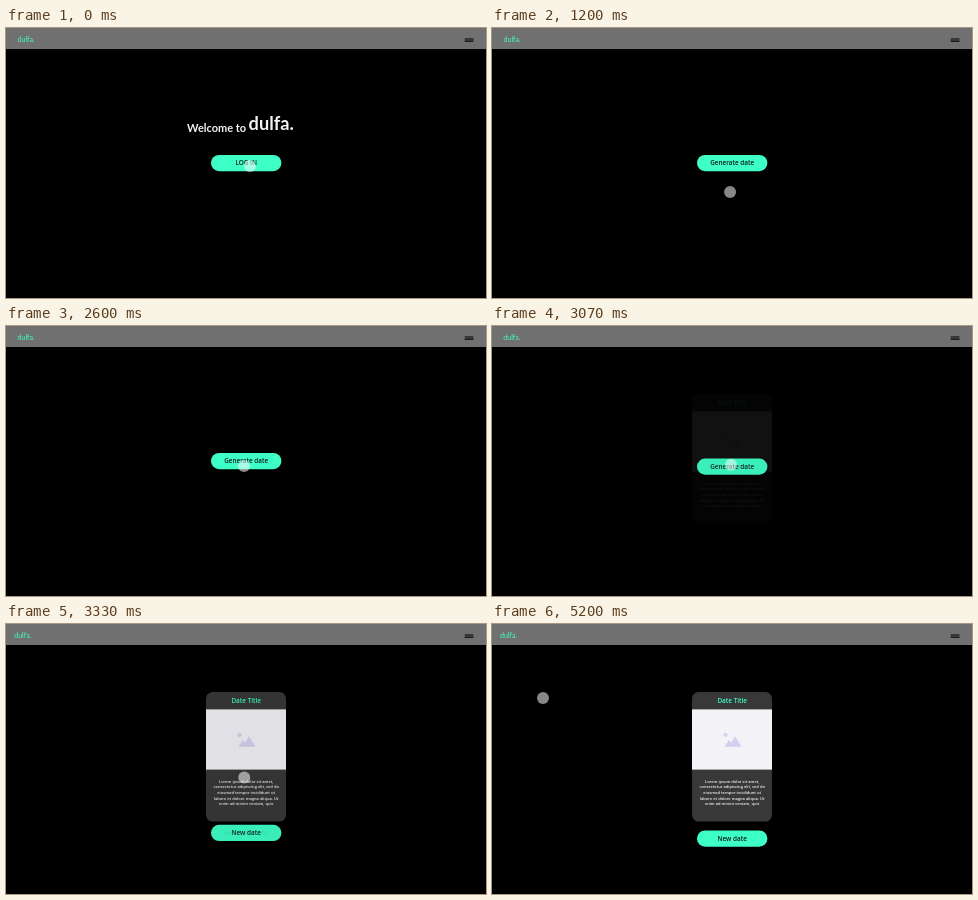
An HTML page that plays this animation: 480 px wide and 270 px high, repeating every 5.27 s.

```html
<!DOCTYPE html>
<html lang="en">
<head>
<meta charset="utf-8">
<title>Date generator prototype</title>
<style>
  html, body { margin: 0; width: 100%; height: 100%; overflow: hidden; background: #000; }
  svg { display: block; width: 100%; height: 100%; }
  text { font-family: "Open Sans", "Noto Sans", sans-serif; font-weight: 600; font-size: 6.4px; }
  .brand { font-family: Lato, sans-serif; }
  .mid { text-anchor: middle; }
  .body { font-size: 4px; fill: #f2f2f2; }
</style>
</head>
<body>
<svg viewBox="0 0 480 270">
  <rect width="480" height="270"/>
  <rect width="480" height="21" fill="#707070"/>
  <text id="logo" class="brand" y="13.6" fill="#3effc6" style="font-size:7px;font-weight:400">dulfa.</text>
  <path d="M458.7 11h8.8M458.7 13.2h8.8" stroke="#000" stroke-width="1.2"/>

  <g id="welcome" fill="#f4f4f4">
    <text class="brand" x="181" y="104" style="font-size:11px;font-weight:700">Welcome to</text>
    <text class="brand" x="242.6" y="102.4" style="font-size:18.2px;font-weight:700">dulfa.</text>
  </g>

  <g id="card">
    <rect x="200" y="68" width="80" height="129.6" rx="6.5" fill="#383838"/>
    <text class="mid" x="240.2" y="79.4" fill="#3effc6">Date Title</text>
    <rect x="200" y="85.4" width="80" height="60.2" fill="#f2f2f7"/>
    <g fill="#d3d1ef">
      <circle cx="233.6" cy="110.8" r="2.1"/>
      <path d="M232.4 122.8l4.6-6.8 2.2 3.1 3.8-6.9 6.6 10.6z"/>
    </g>
    <g id="copy"></g>
  </g>

  <g id="button">
    <rect id="pill" x="205" y="127" width="70.4" height="16.2" rx="8.1" fill="#3effc6"/>
    <g fill="#101a17">
      <text id="login" class="mid" x="240.2" y="137.4">LOG IN</text>
      <text id="generate" class="mid" x="240.2" y="137.4">Generate date</text>
      <text id="renew" class="mid" x="240.2" y="137.4">New date</text>
    </g>
  </g>
  <circle id="cursor" r="6" fill="#fff" fill-opacity=".53"/>
</svg>
<script>
const LOOP = 5270, STEPS = 79;
const $ = id => document.getElementById(id);

[
  "Lorem ipsum dolor sit amet,",
  "consectetur adipiscing elit, sed do",
  "eiusmod tempor incididunt ut",
  "labore et dolore magna aliqua. Ut",
  "enim ad minim veniam, quis"
].forEach((line, i) => {
  const text = document.createElementNS("http://www.w3.org/2000/svg", "text");
  text.setAttribute("class", "mid body");
  text.setAttribute("x", 240.2);
  text.setAttribute("y", 158.8 + i * 5.6);
  text.textContent = line;
  $("copy").append(text);
});

// Cursor strokes: start, end, target x, target y, sideways bow
const home = [244, 138];
const moves = [
  [1030, 1400, 249.5, 197, -8.5],
  [1860, 2450, 238, 140, -5],
  [2700, 3000, 239, 138.8, 0],
  [3130, 3970, 246, 237, -4],
  [4870, 5200, 51, 74, 0]
];

function ease(t, start, end) {
  const p = Math.min(1, Math.max(0, (t - start) / (end - start)));
  return p * p * (3 - 2 * p);
}

function cursorAt(t) {
  let [x, y] = home;
  for (const [start, end, tx, ty, bow] of moves) {
    const p = ease(t, start, end);
    x += (tx - x) * p + bow * Math.sin(Math.PI * p);
    y += (ty - y) * p;
    if (t < end) break;
  }
  return [x, y];
}

const fade = (id, value) => $(id).setAttribute("opacity", value.toFixed(3));
const place = (id, x, y) => $(id).setAttribute("transform", `translate(${x.toFixed(2)} ${y.toFixed(2)})`);

function draw(t) {
  const enter = ease(t, 605, 1000);
  const reveal = ease(t, 3005, 3400);

  fade("welcome", 1 - enter);
  fade("login", 1 - enter);
  fade("generate", enter * (1 - reveal));
  fade("renew", reveal);
  fade("card", reveal);
  fade("pill", 1 - reveal * (1 - reveal));

  place("logo", 11.6 - 3.6 * reveal, 0);
  place("button", 0, 79.5 * reveal);
  place("cursor", ...cursorAt(t));
}

function tick() {
  const size = LOOP / STEPS;
  const step = Math.floor((performance.now() % LOOP + 10) / size);
  draw(Math.min(step, STEPS - 1) * size);
  requestAnimationFrame(tick);
}
tick();
</script>
</body>
</html>
```
